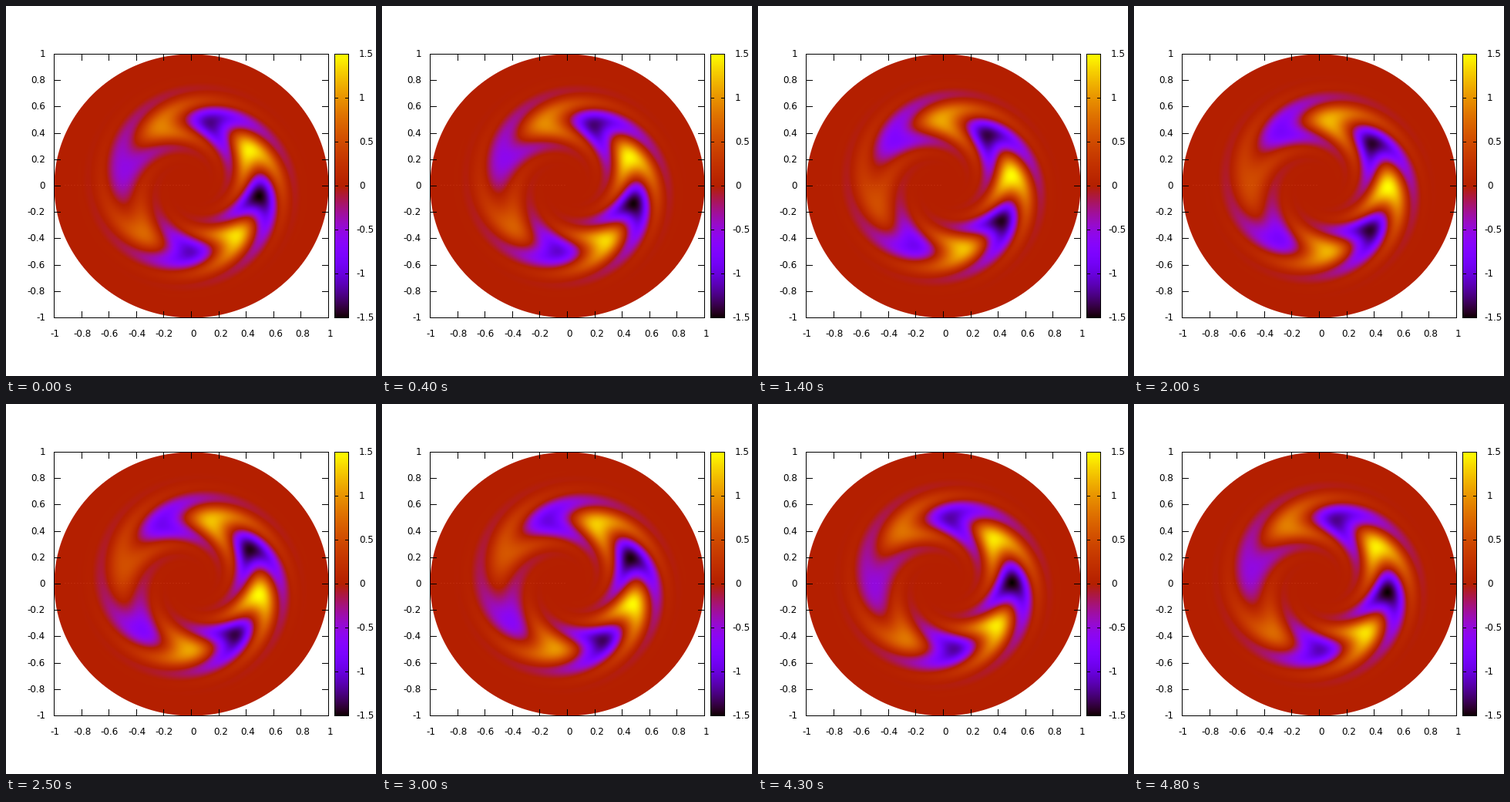
A matplotlib script that plays this animation: 480 by 480 pixels, repeating every 4.9 s.

```python
import numpy as np
import matplotlib.pyplot as plt
from matplotlib.animation import FuncAnimation

SIZE, DPI = 480, 100
FRAMES, INTERVAL = 49, 100
LEFT, RIGHT, TOP, BOTTOM = 62, 418, 62, 404
CX, CY = (LEFT + RIGHT) / 2, (TOP + BOTTOM) / 2
RX, RY = (RIGHT - LEFT) / 2, (BOTTOM - TOP) / 2
BAR_LEFT, BAR_RIGHT = 426, 444
FONT_PX = 12
SPACE = 0.318 * FONT_PX  # blank in place of a minus sign

fig = plt.figure(figsize=(SIZE / DPI, SIZE / DPI), dpi=DPI, facecolor="white")
ax = fig.add_axes([0, 0, 1, 1])
ax.set_xlim(0, SIZE)
ax.set_ylim(SIZE, 0)
ax.axis("off")


def palette(v):
    """Black-blue-red-yellow colours for values in -1.5..1.5."""
    g = np.clip((v + 1.5) / 3, 0, 1)
    blue = np.clip(np.sin(2 * np.pi * g), 0, 1)
    return np.stack([np.sqrt(g), g**3, blue], axis=-1)


def show(rgb, x0, y0):
    h, w = rgb.shape[:2]
    return ax.imshow(rgb, extent=(x0, x0 + w, y0 + h, y0), aspect="auto",
                     interpolation="nearest", zorder=1)


def line(x0, y0, x1, y1):
    ax.plot([x0 + 0.5, x1 + 0.5], [y0 + 0.5, y1 + 0.5], color="black",
            lw=72 / DPI, solid_capstyle="projecting", snap=False, zorder=3)


def box(x0, y0, x1, y1):
    for seg in ((x0, y0, x1, y0), (x1, y0, x1, y1),
                (x1, y1, x0, y1), (x0, y1, x0, y0)):
        line(*seg)


def label(x, y, v, ha):
    ax.text(x, y, f"{v:g}", ha=ha, va="baseline", color="black",
            family="DejaVu Sans", fontsize=FONT_PX * 72 / DPI, zorder=4)


# Polar coordinates of every pixel in the plot
px = np.arange(LEFT, RIGHT + 1)
py = np.arange(TOP, BOTTOM + 1)
X, Y = np.meshgrid((px - CX) / RX, (CY - py) / RY)
R, THETA = np.hypot(X, Y), np.arctan2(Y, X)

# Two spiral modes, m = 4 and m = 5, on a ring of radius 0.5
D2 = (R - 0.5) ** 2
WAVE = np.exp((-50 + 82j) * D2) * (np.exp(4j * THETA) + 0.5 * np.exp(5j * THETA))
COVER = np.clip((1 - R) * 175 + 0.5, 0, 1)[..., None]
SEAM = ((np.abs(Y - 0.006) < 0.003) & (X < 0) & (X > -0.93)
        & (px % 4 < 2))[..., None] * 0.04


def disc(n):
    phase = 2 * np.pi * (n - 19.2) / FRAMES
    rgb = palette((WAVE * np.exp(1j * phase)).real)
    return np.clip(1 + COVER * (rgb + SEAM - 1), 0, 1)


field = show(disc(0), LEFT, TOP)
ramp = palette(np.linspace(1.5, -1.5, BOTTOM - TOP + 1))
show(np.repeat(ramp[:, None], BAR_RIGHT - BAR_LEFT + 1, axis=1), BAR_LEFT, TOP)

box(LEFT, TOP, RIGHT, BOTTOM)
for i in range(-5, 6):
    v = i / 5
    x = round(CX + RX * v)
    y = round(CY - RY * v)
    line(x, TOP, x, TOP + 8)
    line(x, BOTTOM, x, BOTTOM - 8)
    line(LEFT, y, LEFT + 8, y)
    line(RIGHT, y, RIGHT - 8, y)
    label(x + 1 + (SPACE / 2 if v >= 0 else 0), 429, v, "center")
    label(51, y + 4, v, "right")

box(BAR_LEFT, TOP, BAR_RIGHT, BOTTOM)
for i in range(-3, 4):
    v = i / 2
    y = round(CY - RY * v / 1.5)
    line(BAR_LEFT, y, BAR_LEFT + 4, y)
    line(BAR_RIGHT, y, BAR_RIGHT - 4, y)
    label(454 + (SPACE if v >= 0 else 0), y + 4, v, "left")


def update(n):
    field.set_data(disc(n))
    return (field,)


anim = FuncAnimation(fig, update, frames=FRAMES, interval=INTERVAL,
                     repeat=True, repeat_delay=0, blit=False)
plt.show()
```
